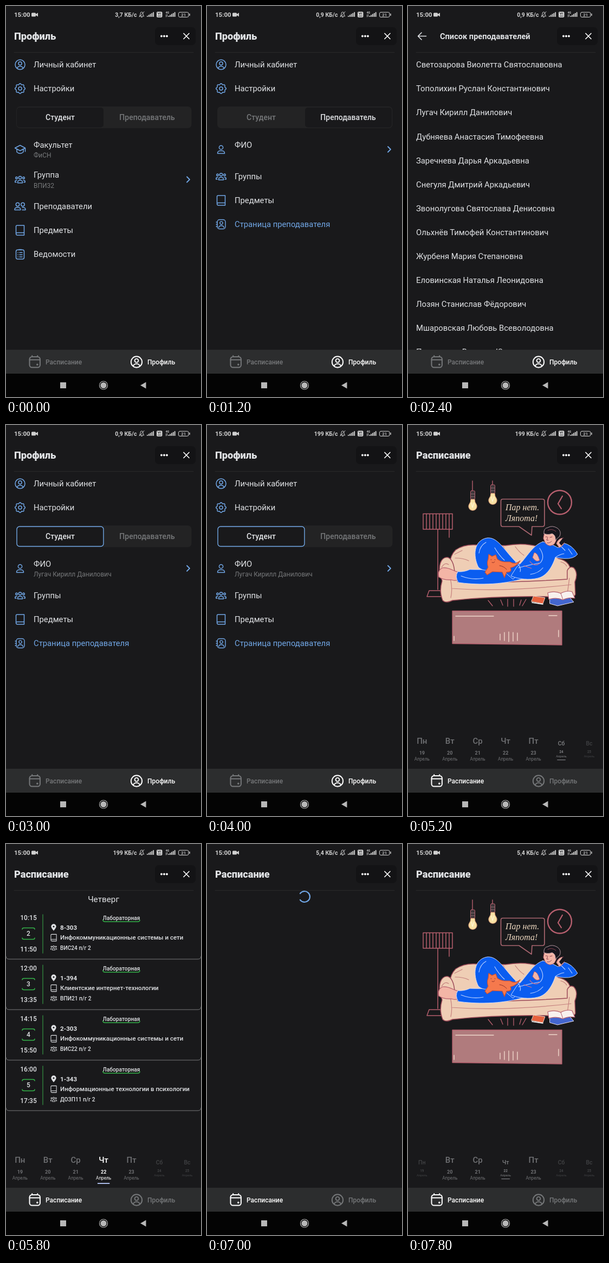
Recreate the animation shown at these times as an HTML page. Size 360 px wide and 720 px high, loop 8000 ms.

```html
<!DOCTYPE html>
<html lang="ru">
<head>
<meta charset="utf-8">
<style>
html, body { margin: 0; width: 100%; height: 100%; overflow: hidden; background: #19191b; }
svg { display: block; width: 100vw; height: 100vh; }
text { font-family: Roboto, sans-serif; white-space: pre; }
.hand { font-family: "Liberation Serif", serif; font-style: italic; }
</style>
</head>
<body>
<svg id="stage" viewBox="0 0 360 720" fill="none" stroke-linecap="round" stroke-linejoin="round">
  <rect width="360" height="720" fill="#19191b"/>
  <g id="status"></g>
  <g id="view"></g>
  <g id="chrome"></g>
</svg>
<script>
const LOOP = 8000, STEP = 200;
const BLUE = '#71a7e6', INK = '#e1e3e6', DIM = '#76787a', GREEN = '#35b34a';
const $ = id => document.getElementById(id);

// Drawing helpers; text is placed by the middle of its capitals.
const text = (x, y, s, size, fill = INK, weight = 400, anchor = 'start', extra = '') =>
  `<text x="${x}" y="${y + size * .355}" font-size="${size}" fill="${fill}" font-weight="${weight}" text-anchor="${anchor}" ${extra}>${s}</text>`;
const line = (d, color, w = 1.5, fill = 'none') =>
  `<path d="${d}" stroke="${color}" stroke-width="${w}" fill="${fill}"/>`;
const shape = (d, fill) => `<path d="${d}" fill="${fill}"/>`;
const box = (x, y, w, h, r, attrs) => `<rect x="${x}" y="${y}" width="${w}" height="${h}" rx="${r}" ${attrs}/>`;
const disc = (x, y, r, fill) => `<circle cx="${x}" cy="${y}" r="${r}" fill="${fill}"/>`;
const ring = (x, y, r, color, w = 1.5) =>
  `<circle cx="${x}" cy="${y}" r="${r}" stroke="${color}" stroke-width="${w}"/>`;
const at = (x, y, s, body) => `<g transform="translate(${x} ${y}) scale(${s})">${body}</g>`;

function gear(c) {
  let d = '';
  for (let i = 0; i < 64; i++) {
    const a = i / 64 * Math.PI * 2, r = 8.4 + Math.cos(a * 8) * .9;
    d += `${i ? 'L' : 'M'}${(Math.cos(a) * r).toFixed(2)} ${(Math.sin(a) * r).toFixed(2)}`;
  }
  return line(d + 'Z', c) + ring(0, 0, 3, c);
}

const ICONS = {
  account: (c, w = 1.5) => ring(0, 0, 9, c, w) + ring(0, -2.2, 3, c, w) + line('M-5.5 6.6Q-4 3 0 3T5.5 6.6', c, w),
  gear,
  hat: c => line('M-9.5 -2.5L0 -7.5L9.5 -2.5L0 2.5ZM-6 0V5Q0 10 6 5V0M9.5 -2.5V4', c),
  group: c => ring(0, -3.5, 2.6, c) + ring(-6.5, -3, 1.8, c) + ring(6.5, -3, 1.8, c) +
    line('M-4.5 6.2Q-5 1.5 0 1.5T4.5 6.2ZM-6 1.5Q-9.5 1 -9.3 5H-7M6 1.5Q9.5 1 9.3 5H7', c),
  users: c => ring(-4.5, -3.5, 3.2, c) + ring(5, -3.5, 3.2, c) +
    line('M-10 6.5Q-10.5 2 -4.5 2T.8 6.5ZM4 2Q10.5 1.5 10 6.5H4', c),
  user: c => ring(0, -3.5, 3.6, c) + line('M-6.5 7.5Q-7 2.5 0 2.5T6.5 7.5Z', c),
  book: c => line('M-7.5 6V-7Q-7.5 -9 -5.5 -9H7.5V9H-5Q-7.5 9 -7.5 6Q-7.5 4.5 -5 4.5H7.5', c),
  sheet: c => box(-7.5, -8, 15, 17, 3, `stroke="${c}" stroke-width="1.5"`) +
    line('M-2.5 -8.5H2.5M-4 -3H-3.8M-1 -3H4M-4 1H-3.8M-1 1H4M-4 5H-3.8M-1 5H4', c),
  page: c => box(-7, -8.5, 15, 17, 4, `stroke="${c}" stroke-width="1.4"`) + ring(.5, -2.4, 2.7, c, 1.4) +
    line('M-4.5 6Q-3.5 2.5 .5 2.5T5.5 6M-9 -4H-7M-9 0H-7M-9 4H-7', c, 1.4),
  pin: c => `<path fill-rule="evenodd" fill="${c}" d="M0 8Q-6 1 -6 -2A6 6 0 0 1 6 -2Q6 1 0 8ZM-2 -2a2 2 0 1 0 4 0a2 2 0 1 0 -4 0Z"/>`,
  calendar: c => box(-9.7, -9, 19.4, 19.5, 4.5, `stroke="${c}" stroke-width="2"`) +
    line('M-9.7 -3.5H9.7M-5 -11V-9M5 -11V-9', c, 2) + disc(4.6, 5.3, 1.7, c)
};
const icon = (name, x, y, color = BLUE, s = 1, w) => at(x, y, s, ICONS[name](color, w));

function statusBar(speed) {
  const c = '#d0d0d0';
  const bars = x => [0, 1, 2, 3, 4].map(i => box(x + i * 2.8, 18 - i * 1.7, 1.9, 2 + i * 1.7, .4, `fill="${c}"`)).join('');
  return text(15, 16, '15:00', 11.5, c, 700) + box(47, 12.5, 8, 7, 1.5, `fill="${c}"`) +
    shape('M55 15L59 12.5V19.5L55 17Z', c) + text(241.5, 16, speed, 10.6, c, 700, 'end') +
    line('M246.5 18.5Q248 17 248 14.5Q248 11 250.5 11T253 14.5Q253 17 254.5 18.5ZM249.500 20.5H251.5M246 20L255 10.5', c, 1) +
    bars(260) + box(278, 10.5, 10.5, 10.5, 2, `fill="${c}"`) +
    line('M280.5 12.5L282 15.5L283.5 12.5M285 12.5V15.5M280.5 18.5H286', '#19191b', .9) +
    text(298, 12.5, '4G', 5, c, 700, 'middle') + line('M295.5 16V20M297.5 15.5V19.5', c, .8) + bars(299.5) +
    box(318.5, 11.5, 18.5, 9, 2.5, `stroke="${c}"`) + line('M339 14.5V17.5', c, 1.4) +
    text(327.8, 16, '21', 8, c, 500, 'middle');
}

function header(title, back) {
  return (back ? line('M33.5 55.5H19M25 49L18.5 55.5L25 62', INK, 1.6) + text(59, 55.5, title, 14.6, INK, 700)
               : text(15, 55.5, title, 18.2, INK, 800)) +
    box(275, 39, 75, 33, 7, 'fill="#131315"') +
    [287, 292, 297].map(x => disc(x, 55.5, 1.9, '#fff')).join('') +
    line('M328 50.5L338 60.5M338 50.5L328 60.5', '#fff', 1.7) +
    line('M15 85.5H346', '#29292a', 1);
}

function chrome(profile) {
  const a = profile ? DIM : '#fff', b = profile ? '#fff' : DIM;
  return box(0, 633, 360, 44, 0, 'fill="#2c2d2e"') + box(0, 677, 360, 43, 0, 'fill="#040404"') +
    icon('calendar', 53.2, 655, a) + text(73, 655.5, 'Расписание', 12, a, 500) +
    icon('account', 241, 655.5, b, 1.13, 1.7) + text(261, 655.5, 'Профиль', 12, b, 500) +
    box(100, 693, 11, 11, 0, 'fill="#b8b8b8"') + ring(180, 698.5, 7.5, '#b8b8b8', 1.2) + disc(180, 698.5, 5.5, '#b8b8b8') +
    shape('M248 698.5L258.5 692.5V704.5Z', '#b8b8b8');
}

const row = (name, y, label, color = INK) => icon(name, 26, y) + text(51, y, label, 14.8, color);
const pair = (name, y, label, sub, more) =>
  icon(name, 26, y) + text(51, y - 8.5, label, 14.8) + text(51, y + 11, sub, 12, DIM) +
  (more ? line(`M334 ${y - 5}L339 ${y}L334 ${y + 5}`, BLUE, 1.8) : '');

function profile({ student, teacher, focus, name = '' }) {
  const x = student ? 20 : 181;
  return header('Профиль') + row('account', 108, 'Личный кабинет') + row('gear', 152, 'Настройки') +
    box(19, 185, 323.5, 40, 7, 'fill="#232324"') +
    box(x, 187, 160, 36.5, 5, focus ? `fill="#19191b" stroke="${BLUE}" stroke-width="1.4"` : 'fill="#19191b"') +
    text(100, 205, 'Студент', 14, student ? INK : DIM, 500, 'middle') +
    text(260.5, 205, 'Преподаватель', 14, student ? DIM : INK, 500, 'middle') +
    (teacher
      ? pair('user', 264, 'ФИО', name, true) + row('group', 314, 'Группы') + row('book', 358, 'Предметы') +
        row('page', 402, 'Страница преподавателя', BLUE)
      : pair('hat', 264, 'Факультет', 'ФиСН') + pair('group', 319.5, 'Группа', 'ВПИ32', true) +
        row('users', 369, 'Преподаватели') + row('book', 413, 'Предметы') + row('sheet', 457, 'Ведомости'));
}

const CHOSEN = 'Лугач Кирилл Данилович';
const TEACHERS = [
  'Светозарова Виолетта Святославовна', 'Тополихин Руслан Константинович', CHOSEN,
  'Дубняева Анастасия Тимофеевна', 'Заречнева Дарья Аркадьевна', 'Снегуля Дмитрий Аркадьевич',
  'Звонолугова Святослава Денисовна', 'Ольхнёв Тимофей Константинович', 'Журбеня Мария Степановна',
  'Еловинская Наталья Леонидовна', 'Лозян Станислав Фёдорович', 'Мшаровская Любовь Всеволодовна',
  'Перелугова Валерия Юлиановна'
];
const list = () => header('Список преподавателей', true) +
  TEACHERS.map((n, i) => text(15, 108 + i * 44.1, n, 14.8)).join('');

const spinner = () => `<path id="spin" d="M171.9 91.1A10 10 0 1 1 171.9 102.9" stroke="${BLUE}" stroke-width="2.2"/>`;

function week(selected, small) {
  return ['Пн', 'Вт', 'Ср', 'Чт', 'Пт', 'Сб', 'Вс'].map((d, i) => {
    const tiny = small.includes(i), on = i === selected;
    const c = on ? (tiny ? '#7f8083' : '#fff') : tiny ? '#414244' : '#707174';
    return at(25.8 + i * 51.45, 597, tiny ? .7 : 1,
      text(0, -15, d, 15, c, 500, 'middle') + text(0, 7, 19 + i, 9, c, 700, 'middle') +
      text(0, 18, 'Апрель', 8.2, c, 400, 'middle') +
      (on ? line('M-10.5 28H10.5', tiny ? '#77787c' : '#a9b9e6', 1.8) : ''));
  }).join('');
}

const LESSONS = [
  ['10:15', 2, '11:50', '8-303', 'Инфокоммуникационные системы и сети', 'ВИС24'],
  ['12:00', 3, '13:35', '1-394', 'Клиентские интернет-технологии', 'ВПИ21'],
  ['14:15', 4, '15:50', '2-303', 'Инфокоммуникационные системы и сети', 'ВИС22'],
  ['16:00', 5, '17:35', '1-343', 'Информационные технологии в психологии', 'ДОЗП11']
];
function lesson([from, n, to, place, subject, group], i) {
  return at(0, i * 93, 1,
    text(41.5, 136, from, 12, INK, 500, 'middle') + text(41.5, 194, to, 12, INK, 500, 'middle') +
    text(41.5, 165, n, 12, INK, 500, 'middle') +
    line('M30 157Q30 154.5 33 154.5H50Q53 154.5 53 157M30 173Q30 175.5 33 175.5H50Q53 175.5 53 173', GREEN, 1.5) +
    line('M68 130V201', '#2f7d3c', 1.5) +
    text(213, 136, 'Лабораторная', 10.2, INK, 500, 'middle') +
    line('M179 140Q179 143 183 143H243Q247 143 247 140', GREEN, 1.5) +
    icon('pin', 88, 153.5, INK, .78) + text(100, 153.5, place, 11.6, INK, 700) +
    icon('book', 88, 172.5, INK, .68) + text(100, 172, subject, 11.5, INK, 500) +
    icon('group', 88, 191, INK, .62) + text(100, 191, group + ' п/г 2', 10.2, INK, 500) +
    line('M0 207Q0 212 6 212H354Q360 212 360 207', '#78797b', 1));
}
const lessons = () => header('Расписание') + text(180, 102, 'Четверг', 15.3, INK, 400, 'middle') +
  LESSONS.map(lesson).join('') + week(3, [5, 6]);

function room() {
  const rose = '#b65f6e', cream = '#efceb5', skin = '#f3b5a6', blue = '#0a5df0', edge = '#9c4a58', shine = '#d8e2ff';
  const bulb = (x, y) => line(`M${x} 103V${y - 27}`, rose, 1.4) +
    box(x - 3.5, y - 28, 8, 16, 2, `fill="#3d3639" stroke="${rose}"`) +
    line(`M${x - 3} ${y - 22}H${x + 4}M${x - 3} ${y - 17}H${x + 4}`, '#8d7176', 1) +
    line(`M${x - 3} ${y - 12}Q${x - 3} ${y - 7} ${x - 6} ${y - 3}A7.5 7.5 0 1 0 ${x + 7} ${y - 3}Q${x + 4} ${y - 7} ${x + 4} ${y - 12}Z`, '#dfa27b', 1.1, '#f8e2a4') +
    line(`M${x - 2} ${y - 6}L${x} ${y + 3}L${x + 3} ${y - 6}`, '#fff6d8', 1.2);
  let slats = '';
  for (let x = 34; x < 80; x += 6) slats += `M${x} 164V191`;
  const lamp = line('M28 163.5H82V192H28Z' + slats, rose, 1.5) +
    line('M55 192V303M76 192V207M39 305H60L62 316H35Z', rose, 1.5);
  const bubble = line('M175 136.5H248Q252 136.5 252 140V183Q252 187 248 187H229L228 203L205 187H175Q171.5 187 171.5 183V140Q171.5 136.5 175 136.5Z', '#a9656f', 1.7) +
    text(180, 151, 'Пар нет.', 16, '#eed8c0', 400, 'start', 'class="hand"') +
    text(180, 171, 'Ляпота!', 16, '#eed8c0', 400, 'start', 'class="hand"');
  const clock = ring(280, 142.5, 22, rose, 2.4) + line('M285 131L277 145L283 154', rose, 2.2);
  const sofa =
    line('M79 270C75 253 78 240 88 230Q104 219 128 221L180 222Q214 216 240 224L278 246Q297 250 300 266V300H80Z', edge, 1.5, cream) +
    line('M63 287C52 258 62 242 74 244Q84 248 86 270L92 289Q185 291 294 284L294 268Q298 259 306 263Q315 273 308 289L309 312Q306 319 294 317Q180 313 82 323Q70 329 64 323Q57 306 63 287Z', edge, 1.5, cream) +
    line('M80 301Q180 308 301 294M74 270Q84 296 79 318M298 282L294 312M87 245Q102 245 112 250M86 238L100 231M282 252Q290 254 293 260M176 224L183 237M198 224Q206 235 214 240M62 262Q68 252 75 257', '#c5807e', 1.2);
  const legs =
    line('M93 270C86 272 78 261 64 263Q54 267 57 280Q66 286 80 285Q91 289 95 281Z', rose, 1.2, skin) +
    line('M92 270Q104 271 114 266Q160 268 205 258L216 282C170 296 122 294 93 290Q86 279 92 270Z', shine, .9, blue) +
    line('M130 262C119 240 122 212 146 208C165 206 176 228 197 250L216 262L194 284C179 272 162 256 151 245L147 267Q138 269 130 262Z', shine, .9, blue);
  const torso =
    line('M249 215C260 217 270 222 277 226L285 217Q303 220 313 238Q306 247 288 246L272 244C266 262 256 278 240 282C223 286 205 284 190 278L201 261C216 250 229 221 249 215Z', shine, .9, blue) +
    line('M243 227Q254 243 244 254Q226 257 204 263M198 252Q210 261 207 270M272 244Q280 238 288 237M283 224L290 231M131 236Q133 222 144 216M98 278Q118 286 139 282M160 226Q168 240 178 249M226 275Q241 273 249 263M296 228L303 238', '#bdd2ff', 1.1) +
    line('M230 244L233 235Q239 235 243 249Q237 254 230 244Z', rose, 1, skin) +
    line('M225 251Q233 262 243 255M214 259L228 264', '#d67485', 1.1);
  const head =
    line('M274 218Q278 208 287 208Q292 214 286 221L280 226Z', rose, 1, skin) +
    shape('M279 217L286 208Q291 208 291 214L283 222Z', '#17151c') +
    line('M252 199Q260 195 272 202Q277 209 270 219Q262 226 254 218L250 209Z', rose, 1, skin) +
    line('M251 200Q250 190 258 189Q266 184 276 190Q284 196 280 205L272 212Q273 203 266 200Q258 203 251 200Z', '#c3a5ad', .9, '#17151c') +
    line('M258 194Q266 190 273 196M254 206L257 206M262 207L266 206M258 207L256 212H259M257 217Q262 218 265 214', '#8b4250', 1);
  const cat = line('M148 247L149 238L155 242L162 239L165 247Q170 251 178 252L188 252Q198 258 207 250Q200 261 189 263Q193 271 182 271L178 281L174 271L156 270L146 276L142 271L148 262Q145 254 148 247Z', '#c84f34', 1.2, '#f5794d') +
    line('M153 248H154M160 248H161M155 253Q158 255 160 252M169 259Q177 260 182 266', '#8f2f28', 1);
  const books = line('M232 315L253 318L249 329L228 325Z', '#efd7c8', 1, '#e7633f') + line('M229 327L249 330', '#fff', 1.6) +
    line('M262 320L298 317L306 326L276 333L262 329Z', '#e8dfe8', 1, '#4366cf') +
    line('M258 309Q271 305 282 310Q293 304 303 307L308 319Q296 317 286 322Q274 317 260 321Z', rose, 1.2, '#f8f1ee') +
    line('M282 310L286 321', rose, 1);
  const rays = line('M148 323L156 333M171 322L175 332M184 321V334M195 321V334M209 322L206 332M218 321L211 333', rose, 1.3);
  const rug = line('M82 342.5H284V405L82 402.5Z', rose, 1.3, '#b07b7d') +
    line('M88 352H158M260 351H275M85 389V397M278 378V390M170 385V396M178 382V397M186 381V399M194 382V398M202 383V397', '#f0d8ca', 1.4);
  return lamp + bulb(119, 149) + bulb(156, 138) + bubble + clock + sofa + legs + torso + head + cat + rays + books + rug;
}
const free = (day, small) => header('Расписание') + room() + week(day, small);

const VIEWS = {
  student: () => profile({ student: true }),
  teacher: () => profile({ teacher: true }),
  chosen: () => profile({ student: true, teacher: true, focus: true, name: CHOSEN }),
  listLoad: () => header('Список преподавателей', true) + spinner(),
  list,
  load: () => header('Расписание') + spinner(),
  saturday: () => free(5, [5, 6]),
  lessons,
  thursday: () => free(3, [0, 3, 5, 6])
};
const SCENES = [[0, 'student'], [1000, 'teacher'], [1600, 'listLoad'], [1800, 'list'], [3000, 'chosen'],
  [4400, 'load'], [4800, 'saturday'], [5600, 'lessons'], [6200, 'chosen'], [6600, 'student'],
  [7000, 'load'], [7400, 'thursday']];
const SPEEDS = [[0, '3,7 КБ/с'], [600, '0,9 КБ/с'], [3400, '199 КБ/с'], [6200, '5,4 КБ/с']];
const ON_SCHEDULE = ['load', 'saturday', 'lessons', 'thursday'];

const pick = (track, t) => track.filter(([start]) => start <= t).pop()[1];
const shown = {};
function put(id, key, draw) {
  if (shown[id] === key) return;
  shown[id] = key;
  $(id).innerHTML = draw(key);
}

function render(now) {
  const t = Math.floor(now % LOOP / STEP) * STEP;
  const scene = pick(SCENES, t);
  put('status', pick(SPEEDS, t), statusBar);
  put('view', scene, key => VIEWS[key]());
  put('chrome', !ON_SCHEDULE.includes(scene), chrome);
  const spin = $('spin');
  if (spin) spin.setAttribute('transform', `rotate(${(t - 7000) / 700 * 360} 180 97)`);
}

const start = performance.now();
function tick() {
  render(performance.now() - start);
  requestAnimationFrame(tick);
}
tick();
</script>
</body>
</html>
```
